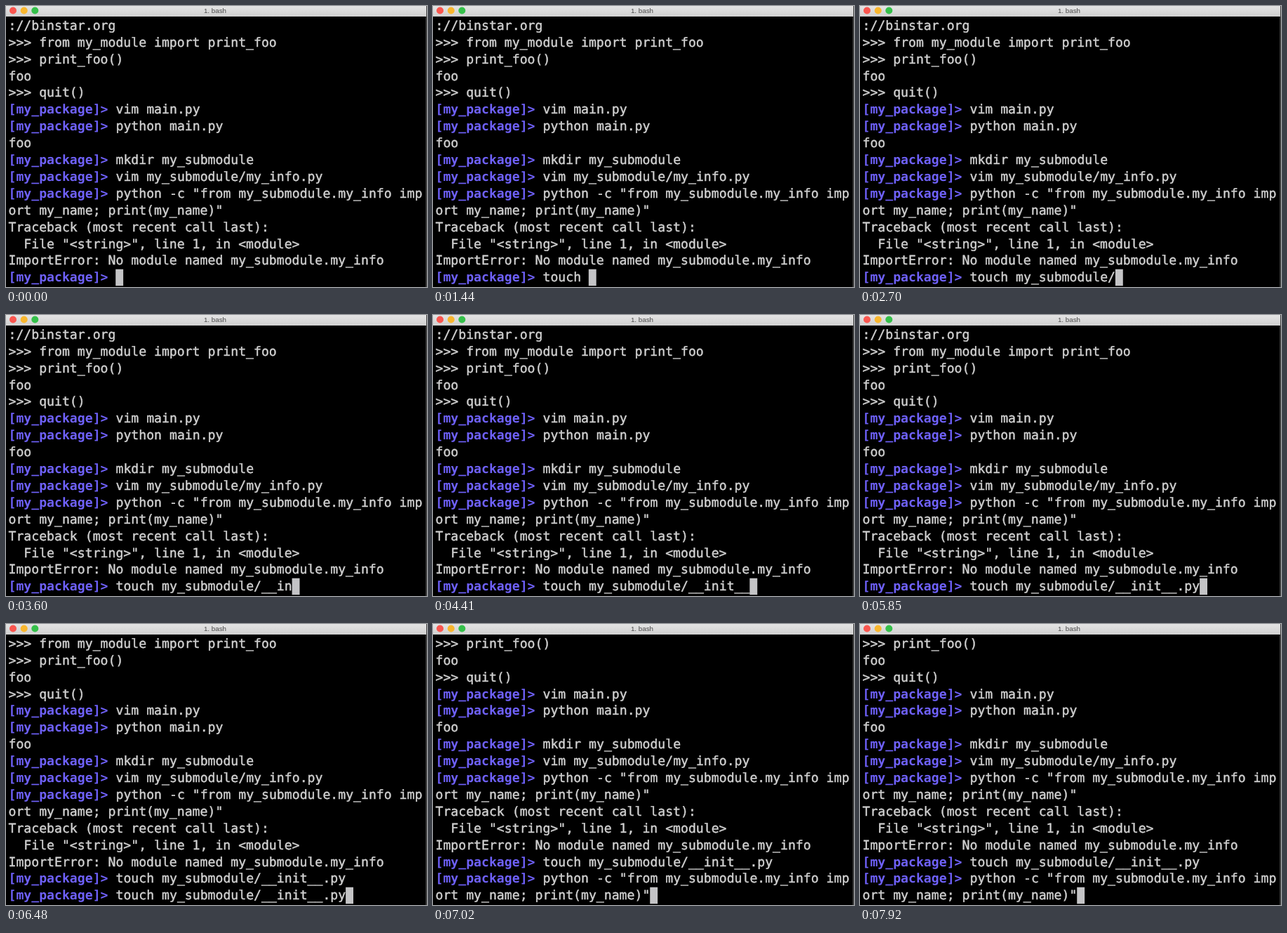
Write an HTML page that moves like this. It is 600x400 px and loops after 8000 ms.

```html
<!DOCTYPE html>
<html lang="en">
<head>
<meta charset="utf-8">
<title>Terminal</title>
<style>
  html, body { margin: 0; width: 100%; height: 100%; overflow: hidden; background: #000; }
  svg { display: block; width: 600px; height: 400px; }
  .row {
    font: 18.15px "DejaVu Sans Mono", monospace;
    white-space: pre;
    text-rendering: geometricPrecision;
    fill: #d0d0d0;
    stroke: #d0d0d0;
    stroke-width: .45px;
  }
  .prompt { font-weight: bold; fill: #6f61fb; stroke: none; }
  .title { font: 9.8px "Liberation Sans", sans-serif; fill: #484848; text-anchor: middle; }
</style>
</head>
<body>
<svg viewBox="0 0 600 400">
  <defs>
    <linearGradient id="bar" x2="0" y2="1">
      <stop offset="0" stop-color="#e4e4e4"/>
      <stop offset="1" stop-color="#d0d0d0"/>
    </linearGradient>
  </defs>
  <rect width="600" height="400"/>
  <g id="screen"></g>
  <rect id="cursor" width="10.9" height="23.6" fill="#c4c4c6"/>
  <rect x="598" width="2" height="400" fill="#3c3c3c"/>
  <rect width="599" height="15" fill="url(#bar)"/>
  <circle cx="10" cy="6.5" r="5" fill="#f9564f"/>
  <circle cx="25.7" cy="6.5" r="5" fill="#f8b62e"/>
  <circle cx="41.3" cy="6.5" r="5" fill="#35c04a"/>
  <text class="title" x="298" y="10.3">1. bash</text>
</svg>
<script>
const LOOP = 8000, ROWS = 16, COLS = 54;
const LEFT = 3.5, TOP = 16.2, CHAR = 10.93, LINE = 23.9, BASE = 17.6;
const PROMPT = '[my_package]> ';
const TOUCH = 'touch my_submodule/__init__.py';
const PYTHON = 'python -c "from my_submodule.my_info import my_name; print(my_name)"';

const history = [
  '://binstar.org',
  '>>> from my_module import print_foo',
  '>>> print_foo()',
  'foo',
  '>>> quit()',
  PROMPT + 'vim main.py',
  PROMPT + 'python main.py',
  'foo',
  PROMPT + 'mkdir my_submodule',
  PROMPT + 'vim my_submodule/my_info.py',
  PROMPT + PYTHON,
  'Traceback (most recent call last):',
  '  File "<string>", line 1, in <module>',
  'ImportError: No module named my_submodule.my_info'
];

// Typed runs: start time, delay per key, characters before and after.
const runs = [
  [630, 125, 0, 6],
  [1710, 180, 6, 10],
  [2520, 0, 18, 19],   // tab completion
  [2970, 175, 19, 27],
  [4680, 230, 27, 30]
];
const ENTER = 5900, UP = 6300, UP_AGAIN = 6930;

function typedCount(t) {
  let count = 0;
  for (const [start, delay, from, to] of runs) {
    if (t < start) break;
    const keys = delay ? Math.floor((t - start) / delay) + 1 : to - from;
    count = Math.min(to, from + keys);
  }
  return count;
}

function linesAt(t) {
  if (t < ENTER) return [...history, PROMPT + TOUCH.slice(0, typedCount(t))];
  const input = t < UP ? '' : t < UP_AGAIN ? TOUCH : PYTHON;
  return [...history, PROMPT + TOUCH, PROMPT + input];
}

function wrap(line) {
  const parts = [];
  for (let i = 0; i < line.length; i += COLS) parts.push(line.slice(i, i + COLS));
  return parts;
}

const screen = document.getElementById('screen');
const cursor = document.getElementById('cursor');

function addText(cls) {
  const el = document.createElementNS('http://www.w3.org/2000/svg', 'text');
  el.setAttribute('class', cls);
  screen.appendChild(el);
  return el;
}

const rows = Array.from({ length: ROWS }, (_, i) => {
  const row = { prompt: addText('row prompt'), body: addText('row') };
  for (const el of [row.prompt, row.body]) {
    el.setAttribute('x', LEFT);
    el.setAttribute('y', TOP + i * LINE + BASE);
  }
  return row;
});

function render(t) {
  const view = linesAt(t).flatMap(wrap).slice(-ROWS);
  rows.forEach(({ prompt, body }, i) => {
    const line = view[i] || '';
    const start = line.startsWith(PROMPT) ? PROMPT.length : 0;
    prompt.textContent = line.slice(0, start);
    body.textContent = line.slice(start);
    body.setAttribute('x', LEFT + start * CHAR);
  });
  const last = view.length - 1;
  cursor.setAttribute('x', LEFT + view[last].length * CHAR - .3);
  cursor.setAttribute('y', TOP + last * LINE);
}

const began = performance.now();
function tick() {
  render((performance.now() - began) % LOOP);
  requestAnimationFrame(tick);
}
tick();
</script>
</body>
</html>
```
